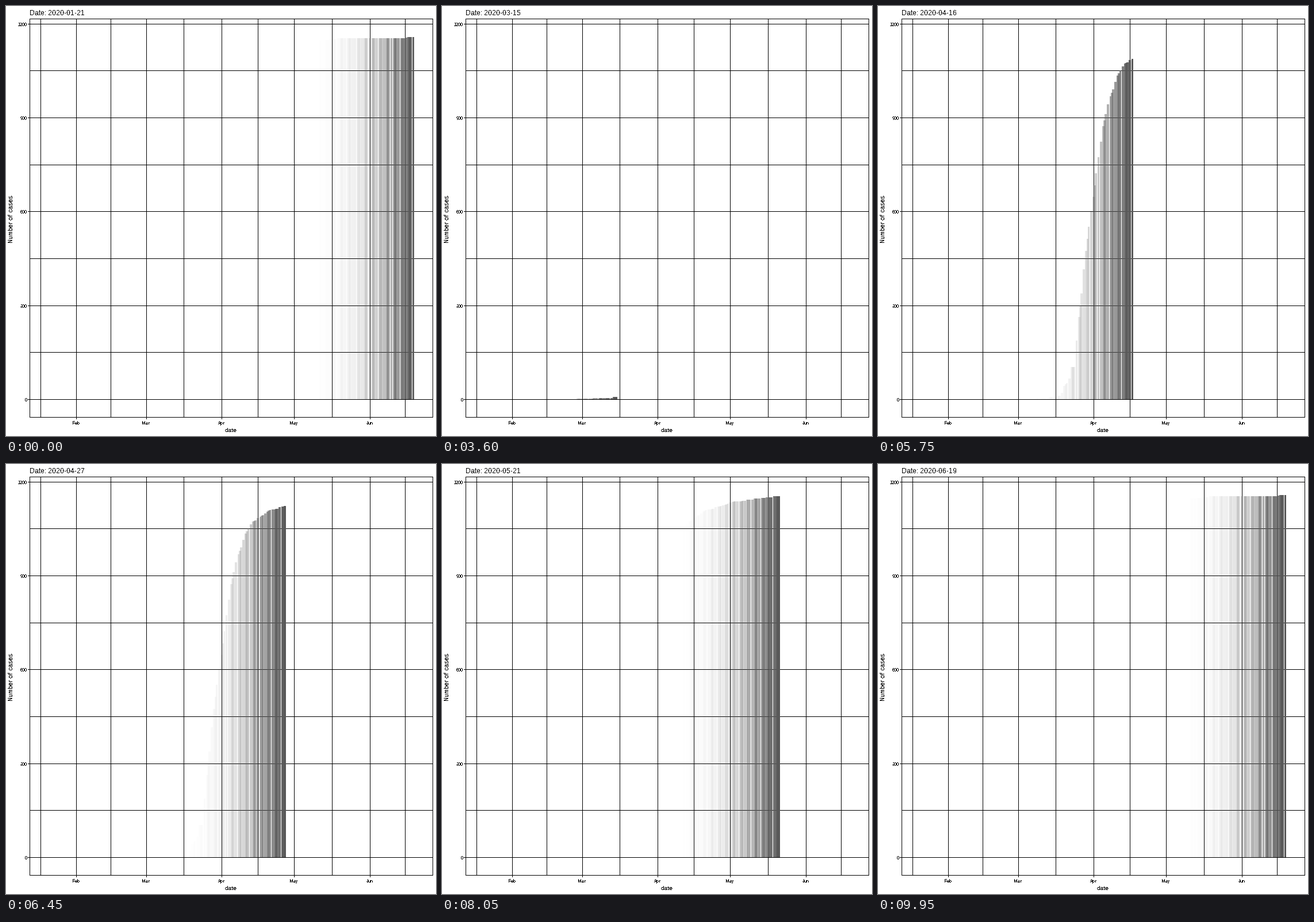
Animation, 748 px wide and 748 px high, one loop 10 s. Source, as a matplotlib script:

```python
import numpy as np
import matplotlib.pyplot as plt
from matplotlib.animation import FuncAnimation
from matplotlib.patches import Rectangle

SIZE = 748
FRAMES, DAYS, WAKE = 200, 150, 60
START = np.datetime64("2020-01-21")
X0, PER_DAY = 75.13, 4.2231
Y0, PER_CASE = 684.3, 0.5446
LEFT, RIGHT, TOP, BOTTOM = 41, 742, 22, 715

plt.rcParams.update({
    "font.family": "Liberation Sans",
    "text.antialiased": False,
    "text.hinting": "native",
    "text.hinting_factor": 1,
})

# Cumulative cases: sparse early days, a daily rise, then a plateau
early = [(0, 0), (37, 0), (38, 1), (44, 1), (45, 5), (52, 5), (53, 7), (54, 7)]
rise = [8, 10, 12, 20, 43, 52, 67, 103, 103, 188, 263, 338, 415, 474, 551,
        599, 647, 722, 774, 823, 873, 911, 943, 969, 991, 1014, 1035, 1050,
        1064, 1072, 1077, 1084, 1088, 1093, 1099, 1105, 1109, 1112, 1112,
        1114, 1118, 1121, 1122, 1124, 1127, 1130, 1133, 1136, 1137, 1137,
        1137, 1139, 1139, 1142]
late = [(110, 1143), (111, 1147), (113, 1147), (114, 1149), (115, 1149),
        (116, 1150), (118, 1150), (119, 1154), (146, 1154), (147, 1156),
        (148, 1158), (150, 1158)]
known = early + list(enumerate(rise, start=55)) + late

# Each day lands on a whole frame; skipped frames are interpolated
days = np.arange(DAYS + 1)
day_frames = np.round(1 + (FRAMES - 1) * days / DAYS) - 1
position = np.interp(np.arange(FRAMES), day_frames, days)
cases = np.interp(position, *zip(*known))

fig = plt.figure(figsize=(SIZE / 72, SIZE / 72), dpi=72, facecolor="white")
ax = fig.add_axes([0, 0, 1, 1])
ax.set_xlim(0, SIZE)
ax.set_ylim(SIZE, 0)
ax.axis("off")


def box(x, y, w, h, color="black", z=1):
    patch = Rectangle((x, y), w, h, facecolor=color, linewidth=0,
                      antialiased=False, zorder=z)
    return ax.add_patch(patch)


def label(x, y, text, size, ha="center", **kw):
    return ax.text(x, y, text, fontsize=size, ha=ha, va="baseline",
                   color="black", **kw)


def h_line(y, x=LEFT):
    box(x, y, RIGHT + 1 - x, 1)


def v_line(x, bottom=BOTTOM):
    box(x, TOP, 1, bottom + 1 - TOP)


# Grid, ticks and panel border
for value in range(0, 1201, 150):
    row = int(Y0 - value * PER_CASE + 0.25)
    major = value % 300 == 0
    h_line(row, LEFT - 3 if major else LEFT)
    if major:
        label(36.5, row + 4, str(value), 8.2, ha="right")

for col, month in zip((122, 244, 375, 501, 633),
                      ("Feb", "Mar", "Apr", "May", "Jun")):
    v_line(col, BOTTOM + 3)
    label(col - 0.5, 728, month, 8.2)
for col in (60, 182, 309, 438, 567, 694):
    v_line(col)

for y in (TOP, BOTTOM):
    h_line(y)
for x in (LEFT, RIGHT):
    v_line(x)

label(391, 741, "date", 10.2)
ax.text(14, 370, "Number of cases", fontsize=10.5, rotation=90,
        ha="right", va="center", color="black")
title = label(41, 16, "", 11.9, ha="left")

# Oldest bar of the wake first, current bar last
ages = np.arange(WAKE - 1, -1, -1)
alphas = np.round((1 - ages / WAKE) ** 3 * 255) / 255
bars = [box(0, 0, 0, 0, "#595959", 2) for _ in ages]
for bar, alpha in zip(bars, alphas):
    bar.set_alpha(alpha)


def update(frame):
    title.set_text(f"Date: {START + frame * DAYS // (FRAMES - 1)}")
    base = int(Y0)
    for bar, age in zip(bars, ages):
        k = (frame - age) % FRAMES
        left = round(X0 + (position[k] - 0.45) * PER_DAY)
        right = round(X0 + (position[k] + 0.45) * PER_DAY)
        height = base - round(Y0 - cases[k] * PER_CASE)
        if cases[k] >= 1:
            height = max(height, 1)
        bar.set_bounds(left, base - height, right - left, height)
        bar.set_visible(height > 0)
    return bars + [title]


anim = FuncAnimation(fig, update, frames=FRAMES, interval=50, repeat=True,
                     blit=False)
plt.show()
```
